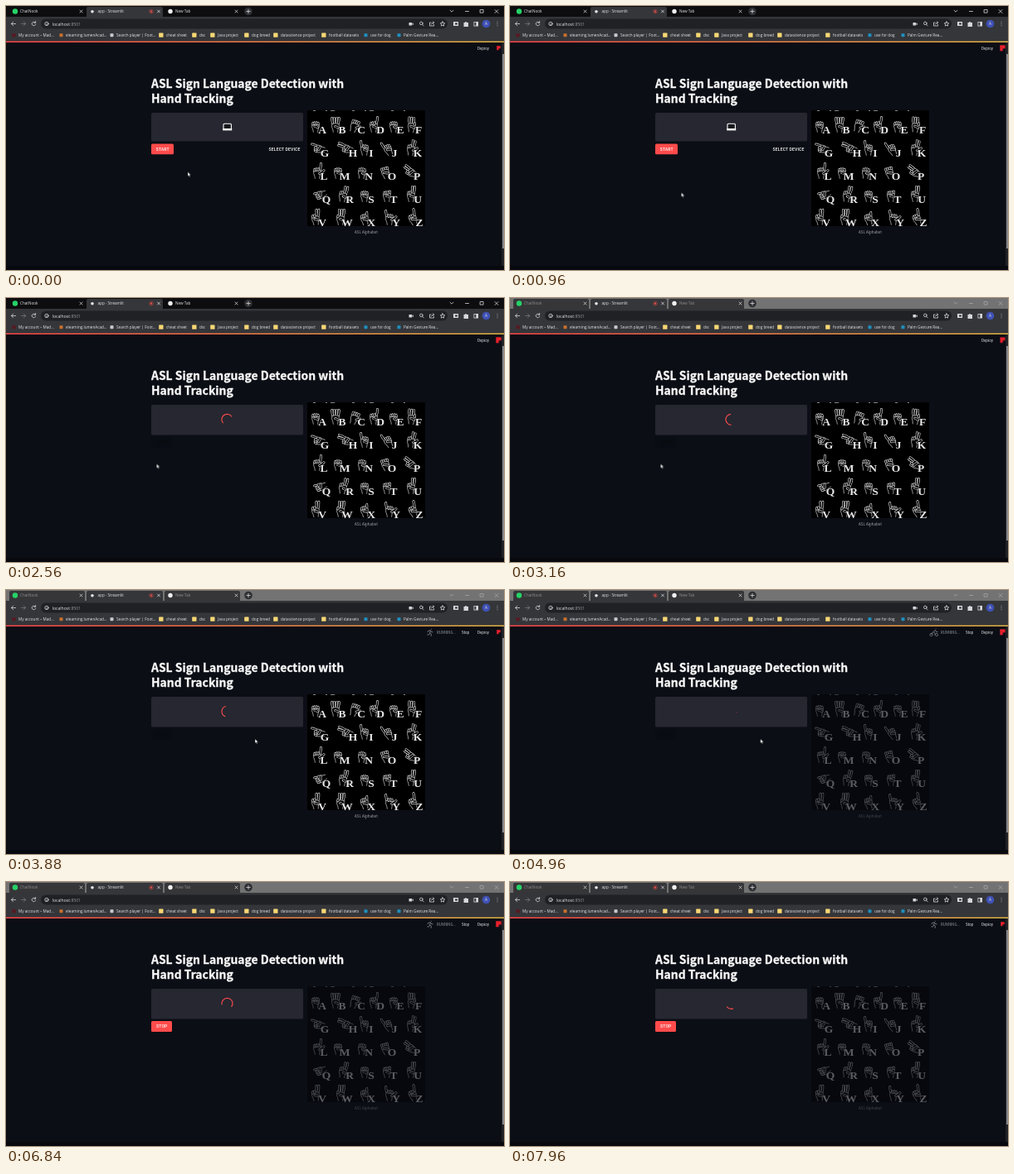
Recreate the animation shown at these times as an HTML page. Size 600 by 319 pixels, loop 8000 ms.

```html
<!DOCTYPE html>
<html lang="en">
<head>
<meta charset="utf-8">
<title>Sign language app</title>
<style>
html, body { margin: 0; width: 100%; height: 100%; overflow: hidden; background: #0b0e15; }
svg { display: block; width: 600px; height: 319px; }
text { white-space: pre; }
.ui { font: 4.65px 'Open Sans', 'Noto Sans', sans-serif; fill: #e4e5e8; }
.app { font-family: 'Noto Sans CJK JP', 'Noto Sans CJK SC', 'Noto Sans', sans-serif; fill: #fafafa; }
.title { font-size: 13.9px; font-weight: 700; stroke: #fafafa; stroke-width: .3px; }
.btn { font: 500 5.1px Roboto, sans-serif; letter-spacing: .14px; fill: #fafafa; }
.line { fill: none; stroke: #d5d7da; stroke-width: .8; stroke-linecap: round; stroke-linejoin: round; }
.letter { font: bold 13.5px 'Liberation Serif', serif; text-anchor: middle; fill: #e8e8e8;
  stroke: #000; stroke-width: 1px; paint-order: stroke; }
.rim, .core { fill: none; stroke-linecap: round; }
.rim { stroke: #ddd; stroke-width: 3.1; }
.core { stroke: #000; stroke-width: 1.7; }

.timed { animation: 8s step-end infinite; }
.idle { animation-name: idle; }
.loading { animation-name: loading; }
.running { animation-name: running; }
.stop { animation-name: stop; }
.strip { animation-name: strip; }
.tab { animation-name: tab; }
.dimmed { animation-name: dim; }
.arrow { animation-name: arrow; }
.hand { animation-name: hand; }
.start { animation: hover 8s linear infinite; }
.stale { animation: stale 8s linear infinite; }
.cursor { animation: move 8s ease-in-out infinite; }
.pulse { transform-origin: 593.5px 50.5px; animation: pulse 2s ease-in-out infinite; }

@keyframes idle { 0% { opacity: 1 } 26.63%, to { opacity: 0 } }
@keyframes loading { 0% { opacity: 0 } 26.63%, to { opacity: 1 } }
@keyframes running { 0% { opacity: 0 } 41.25%, to { opacity: 1 } }
@keyframes stop { 0% { opacity: 0 } 68%, to { opacity: 1 } }
@keyframes strip { 0% { fill: #0d0d0f } 36%, to { fill: #737373 } }
@keyframes tab { 0% { fill: #0d0d0f } 36%, to { fill: #363638 } }
@keyframes dim { 0% { opacity: 1 } 36%, to { opacity: .5 } }
@keyframes arrow { 0% { opacity: 1 } 18.5% { opacity: 0 } 27% { opacity: 1 } 78%, to { opacity: 0 } }
@keyframes hand { 0% { opacity: 0 } 18.5% { opacity: 1 } 27%, to { opacity: 0 } }
@keyframes hover { 0%, 18.5% { fill: #ff4b4b } 21%, to { fill: #b53438 } }
@keyframes stale { 0%, 49% { opacity: 1; animation-timing-function: ease-in } 61%, to { opacity: .36 } }
@keyframes move {
  0% { transform: translate(219px, 200.5px) }
  9% { transform: translate(216px, 215px) }
  13% { transform: translate(205px, 227px) }
  20%, 27% { transform: translate(186px, 172px) }
  31%, 42.5% { transform: translate(181.5px, 200.5px) }
  48% { transform: translate(300px, 180px) }
  60%, to { transform: translate(301.7px, 180px) }
}
@keyframes pulse { 0%, to { transform: scale(.9) } 35% { transform: scale(1.3) } }
</style>
</head>
<body>
<svg viewBox="0 0 600 319">
  <defs>
    <linearGradient id="bar"><stop stop-color="#ff4b4b"/><stop offset="1" stop-color="#e8b94a"/></linearGradient>
    <clipPath id="chartClip"><path d="M363 126h142v140h-142z"/></clipPath>
  </defs>

  <!-- browser tabs -->
  <path class="timed strip" d="M0 0h600v14H0z"/>
  <path class="timed tab" d="M4 14V3q0-2 2-2h87q2 0 2 2v11zM191 14V3q0-2 2-2h87q2 0 2 2v11z"/>
  <path fill="#35363a" d="M97 14V3q0-2 2-2h88q2 0 2 2v11zM0 13h600v30H0z"/>
  <circle cx="11" cy="6.5" r="3.2" fill="#25d366"/>
  <circle cx="104" cy="6.8" r="1.8" fill="#e8e8e8"/>
  <circle cx="198" cy="6.5" r="2.7" fill="#f1f1f1"/>
  <g class="ui">
    <text class="timed dimmed" x="17" y="8.2">ChatNook</text>
    <text x="110.5" y="8.2">app · Streamlit</text>
    <text class="timed dimmed" x="204" y="8.2">New Tab</text>
  </g>
  <circle cx="175" cy="6.6" r="1.2" fill="#ef5350"/>
  <circle cx="175" cy="6.6" r="2.4" fill="none" stroke="#c8453f" stroke-width=".6"/>
  <path class="line" d="M89 5l3 3m0-3l-3 3M182.500 5l3 3m0-3l-3 3M276 5l3 3m0-3l-3 3"/>
  <circle cx="292" cy="6.5" r="4.8" fill="#2e2f32"/>
  <path class="line" d="M289.800 6.500h4.400M292 4.300v4.400"/>
  <path class="line timed dimmed" d="M535 5.200l2 2 2-2M553.500 6.500h4M571.500 4.500h3.600v3.600h-3.600zM589 4.500l4 4m0-4l-4 4"/>

  <!-- toolbar -->
  <rect x="42" y="15.5" width="490" height="12" rx="6" fill="#202124"/>
  <path class="line" d="M11.500 21.500H6.500m2.200-2.300l-2.300 2.300 2.300 2.300M35.300 20a2.300 2.300 0 1 0 .4 2.200M35.600 18.500V20.300h-1.800"/>
  <path class="line" opacity=".4" d="M18.500 21.500h5m-2.200-2.300l2.300 2.300-2.300 2.300"/>
  <circle class="line" cx="49" cy="21.5" r="2.2"/>
  <path class="line" d="M49 21.300v1.300"/>
  <text class="ui" x="55.700" y="23.500" style="font-size:5.1px">localhost<tspan fill="#94979c">:8501</tspan></text>
  <path fill="#d5d7da" d="M485.500 20h3.600v3.500h-3.600zM489.500 21.200l1.300-.8v2.700l-1.300-.8zM539 19h6v5h-6zM551.500 20h1.500a1 1 0 0 1 2 0h2v5h-5.500zM563.500 19h5.500v5.500h-5.500z"/>
  <path fill="#35363a" d="M541 20.500h3v2h-3zM564.300 19.800h2v3.900h-2z"/>
  <circle class="line" cx="500.300" cy="20.900" r="1.800"/>
  <path class="line" d="M501.700 22.400l1.500 1.500M512 20h-1.500v4h5v-1.500M512.500 22q.5-2 3-2m-1-1.300l1.300 1.300-1.300 1.300M526 18.800l.8 1.800 2 .2-1.500 1.300.4 2-1.700-1-1.700 1 .4-2-1.500-1.300 2-.2z"/>
  <circle cx="578.5" cy="21.5" r="4.8" fill="#3f51b5"/>
  <text class="ui" x="578.500" y="23.100" text-anchor="middle">A</text>
  <path class="line" d="M592 19.300v0m0 2.200v0m0 2.200v0"/>
  <g class="ui" id="bookmarks"></g>

  <!-- page -->
  <path fill="#0b0e15" d="M0 42.500h600V319H0z"/>
  <path fill="url(#bar)" d="M0 42.600h600v1.300H0z"/>
  <path fill="#202125" d="M597 44h3V314h-3z"/>
  <path fill="#85868a" d="M598 58h2v235h-2z"/>
  <path fill="#07090e" d="M0 314h600v5H0z"/>

  <g class="app" font-size="4.3" font-weight="500">
    <text x="568" y="52.500">Deploy</text>
    <g class="timed running">
      <text x="519" y="52.500" style="fill:#9a9ca2" font-weight="400">RUNNING...</text>
      <text x="549" y="52.500">Stop</text>
      <path id="athlete" class="line" style="stroke:#85878d"/>
    </g>
  </g>
  <path class="pulse" fill="#e8202c" d="M591 48h5v3.200h-2.300v2.300H591z"/>

  <g class="app title">
    <text x="175" y="98.500">ASL Sign Language Detection with</text>
    <text x="175" y="116.800">Hand Tracking</text>
  </g>

  <g class="timed idle">
    <rect x="175" y="129" width="183" height="34.5" rx="1.5" fill="#262730"/>
    <rect x="262" y="142.300" width="9.400" height="7.200" rx="1" fill="#15161b" stroke="#fff" stroke-width="1.100"/>
    <path fill="#fff" d="M261.200 148h11v2.400h-11z"/>
    <rect class="start" x="175" y="166.5" width="27" height="12.7" rx="1.5"/>
    <text class="btn" x="180.700" y="174.700">START</text>
    <text class="btn" x="316.500" y="174.700">SELECT DEVICE</text>
  </g>
  <g class="timed loading">
    <rect x="175" y="129" width="183" height="36.5" rx="1.5" fill="#262730"/>
    <circle id="spinner" cx="266.5" cy="146.8" r="6.5" pathLength="126.9" fill="none" stroke="#f2494c" stroke-width="1.2"/>
    <rect x="175" y="168" width="25" height="13" rx="1.5" fill="#000" opacity=".1"/>
    <text class="btn" x="181" y="176.400" style="fill:#000" opacity=".3">STOP</text>
  </g>
  <g class="timed stop">
    <rect x="175" y="168" width="25" height="13" rx="1.5" fill="#ff4b4b"/>
    <text class="btn" x="181" y="176.400">STOP</text>
  </g>

  <g class="stale">
    <path fill="#000" d="M363 126h142v140h-142z"/>
    <path stroke="#bbb" stroke-width=".8" stroke-dasharray="3 12 2 4 5 21" d="M370 126.400h112"/>
    <g id="chart" clip-path="url(#chartClip)"></g>
    <text class="app" x="434" y="275" font-size="4.500" text-anchor="middle" style="fill:#a2a4a9">ASL Alphabet</text>
  </g>

  <g class="cursor">
    <path class="timed arrow" fill="#fff" stroke="#111" stroke-width=".4" d="M0 0v5.200l1.200-1.100.9 1.900.9-.4-.9-1.800h1.700z"/>
    <path class="timed hand" fill="#fff" stroke="#111" stroke-width=".4" d="M0 .5q.7-1 1.200 0v2.300l2.800.7q.7.300.5 1.200l-.6 2.800H.8L-1.300 5q-.3-1 .6-.7l.7.600z"/>
  </g>
</svg>
<script>
const $ = id => document.getElementById(id);

// Bookmarks: icon x, icon colour (folders by default), label.
const folder = '#f7d774', blue = '#1f8fc0';
$('bookmarks').innerHTML = [
  [6, '#5a1720', 'My account – Mad...'], [63, '#c9702b', 'elearning.lumenAcad...'],
  [124, '#c9cbd0', 'Search player | Foot...'], [184, folder, 'cheat sheet'], [224, folder, 'dsc'],
  [246, folder, 'Java project'], [287, folder, 'dog breed'], [322, folder, 'datascience project'],
  [380, folder, 'football datasets'], [430, blue, 'use for dog'], [470, blue, 'Palm Gesture Rea...']
].map(([x, color, label]) => {
  const size = color === folder ? 5.3 : 4;
  return `<rect x="${x + 5.5 - size}" y="${35.2 - size / 2}" width="${size}" height="${size}" rx=".6" fill="${color}"/>` +
    `<text x="${x + 9}" y="37">${label}</text>`;
}).join('');

// Slightly bent finger drawn as an outlined capsule.
function finger(x, y, degrees, length) {
  const a = degrees * Math.PI / 180;
  const dx = Math.sin(a) * length, dy = -Math.cos(a) * length;
  const bend = Math.sign(x) * .08;
  const d = `M${x} ${y}q${dx / 2 - dy * bend} ${dy / 2 + dx * bend} ${dx} ${dy}`;
  return `<path class="rim" d="${d}"/><path class="core" d="${d}"/>`;
}

// Lengths run from little finger to index, then thumb; 0 is folded.
function drawHand(x, y, lengths, turn) {
  const [thumb, ...rest] = [...lengths].map(Number).reverse();
  let raised = '', folded = '';
  rest.reverse().forEach((length, i) => {
    const base = (i - 1.5) * 2.2;
    if (length) raised += finger(base, -2, (i - 1.5) * 7, length);
    else folded += finger(base, -2.5 + Math.abs(base) * .25, 0, 1.8);
  });
  const palm = '<path d="M-2.800 9L-3.600 5Q-5.500 2-4.600-2Q0-4 4.600-2Q5.400 2 3.300 5L2.800 9" fill="#000" stroke="#ddd" stroke-width=".7"/>';
  const thumbPath = thumb > 4 ? finger(3, 2, 55, thumb) : finger(3, 2.5, -70, thumb + 1.5);
  return `<g transform="translate(${x} ${y}) rotate(${turn}) scale(.92)">${raised}${palm}${folded}${thumbPath}</g>`;
}

// Each entry: letter, its centre x, finger lengths, hand rotation.
const chart = [
  'A381 00003 0,B405 88882 0,C428 44445 20,D451 00092 0,E475 00001 0,F497 88803 8',
  'G384 00073 -80,H418 00993 -75,I440 80002 0,J468 80003 -25,K496 00986 5',
  'L383 00097 0,M408 00002 0,N437 00001 5,O465 33334 -15,P495 00774 -60',
  'Q386 00043 -110,R414 00991 8,S440 00003 0,T467 00032 0,U496 00992 0',
  'V381 00993 -4,W411 09992 0,X440 00053 -10,Y470 80007 0,Z498 00093 -20'
];
$('chart').innerHTML = chart.map((row, r) => {
  const baseline = 153.5 + r * 28;
  return row.split(',').map(entry => {
    const [head, lengths, turn] = entry.split(' ');
    const x = +head.slice(1);
    return drawHand(x - 8, baseline - 9, lengths, turn) +
      `<text class="letter" x="${x}" y="${baseline}">${head[0]}</text>`;
  }).join('');
}).join('');

// Status figures: cyclist, runner, swimmer.
const athletes = [
  'M507.500 52.300a1.700 1.700 0 1 0 .1 0M514 52.300a1.700 1.700 0 1 0 .1 0M508 53.500l2-3 2 1.500v2M510 50.500l2.500-2 1 2h1.500M513 46.800v0',
  'M512.500 47.300v0M511.500 49l-1 3 2 1.200-.5 2.500M510.500 52l-.8 2h-2M508 50.800l1-1.800h2.500l1.200 1.800h1.500',
  'M507 53.500q1.200-1.200 2.400 0t2.400 0 2.400 0M508 51.800l2.500-2-1-1.500h-2M513 51v0M510.500 49.800l2 2'
];

const smooth = p => p * p * (3 - 2 * p);

function render(t) {
  const phase = (t + 670) % 1400 / 1400;
  const grow = smooth(Math.min(1, phase * 2));
  const chase = smooth(Math.max(0, phase * 2 - 1));
  const spinner = $('spinner');
  spinner.setAttribute('stroke-dasharray', `${1 + 99 * grow} 200`);
  spinner.setAttribute('stroke-dashoffset', -15 * grow - 110 * chase);
  spinner.setAttribute('transform', `rotate(${phase * 360} 266.5 146.8)`);
  const step = Math.floor(Math.max(0, t - 3300) / 450);
  $('athlete').setAttribute('d', athletes[step % athletes.length]);
}

let start;
requestAnimationFrame(function tick(now) {
  start ??= now;
  render((now - start) % 8000);
  requestAnimationFrame(tick);
});
</script>
</body>
</html>
```
